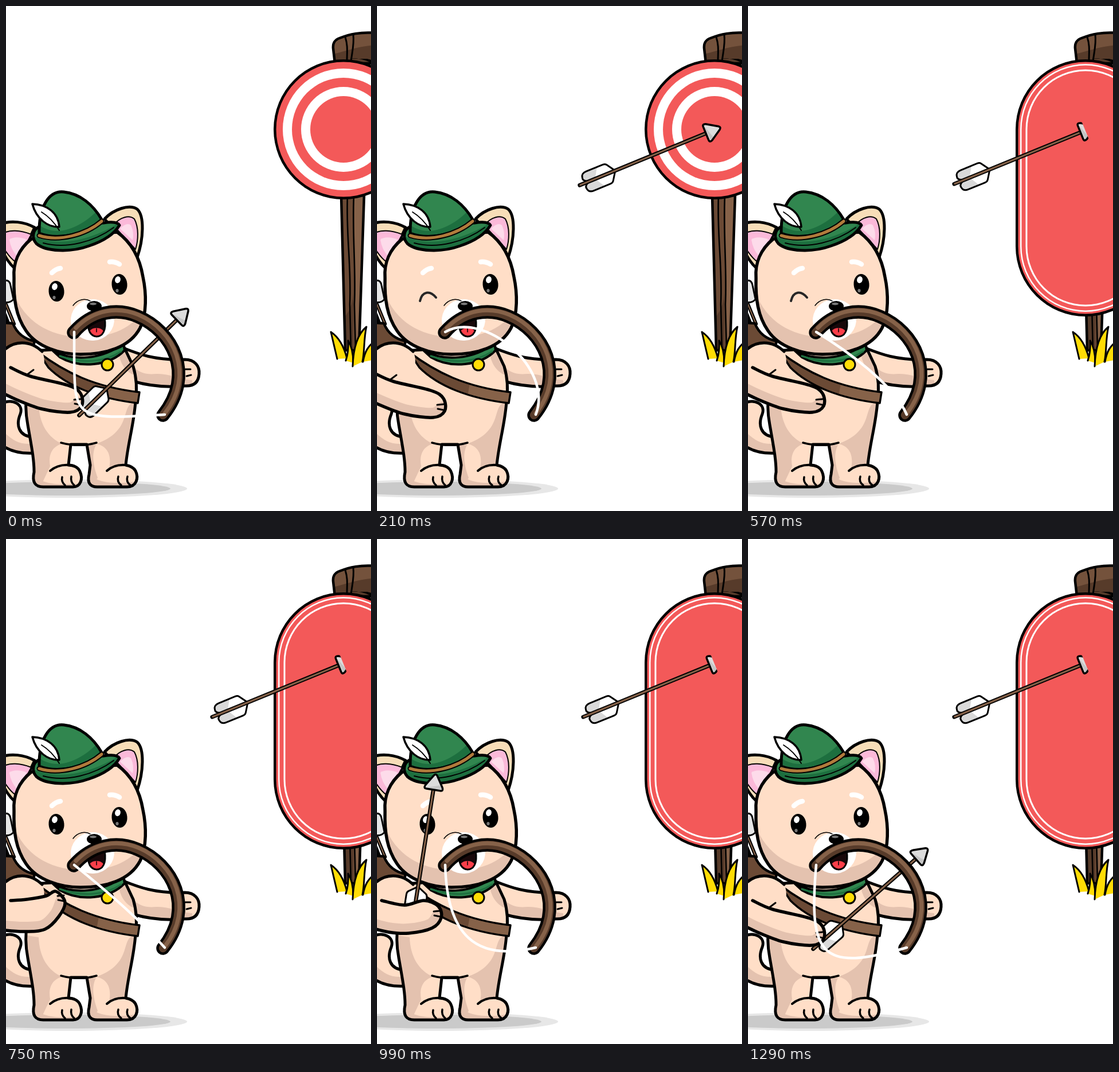
An HTML page with a canvas for the animation above (3600 ms loop, 637 px wide and 880 px high).

```html
<!DOCTYPE html>
<html lang="en">
<head>
<meta charset="utf-8">
<title>Archer</title>
<style>
html, body { margin: 0; width: 100%; height: 100%; overflow: hidden; background: #fff; }
canvas { display: block; width: 637px; height: 880px; }
</style>
</head>
<body>
<canvas id="stage" width="637" height="880"></canvas>
<script>
const ctx = document.getElementById('stage').getContext('2d');
const LOOP = 3600, STEP = 30, ARROW = 266;
const INK = '#000', SKIN = '#ffdec7', SHADE = '#e4c2af', RED = '#f35959';
const WOOD = '#6b4a35', WOOD_DARK = '#573b2a', WOOD_LIGHT = '#866249';
const GREEN = '#31864f', GREEN_DARK = '#1d6f3f', YELLOW = '#ffdc05';

const mix = (a, b, k) => a + (b - a) * k;
const smooth = k => k * k * (3 - 2 * k);
const clamp = k => Math.max(0, Math.min(1, k));
const easeOut = (k, power) => 1 - Math.pow(1 - clamp(k), power);

// Keys are [time, ...values]
function at(keys, t) {
  let i = 0;
  while (i < keys.length - 2 && t >= keys[i + 1][0]) i++;
  const a = keys[i], b = keys[i + 1];
  const k = smooth(clamp((t - a[0]) / (b[0] - a[0])));
  return a.slice(1).map((v, n) => mix(v, b[n + 1], k));
}

function paint(path, fill, width, color = INK) {
  const p = typeof path === 'string' ? new Path2D(path) : path;
  if (fill) { ctx.fillStyle = fill; ctx.fill(p); }
  if (width) { ctx.strokeStyle = color; ctx.lineWidth = width; ctx.stroke(p); }
}

function oval(x, y, rx, ry, fill, width, turn = 0) {
  const p = new Path2D();
  p.ellipse(x, y, rx, ry, turn, 0, Math.PI * 2);
  paint(p, fill, width);
}

function clipped(path, draw) {
  ctx.save();
  ctx.clip(new Path2D(path));
  draw();
  ctx.restore();
}

function spline(pts, close) {
  const p = new Path2D();
  p.moveTo(...pts[0]);
  for (let i = 0; i < pts.length - 1; i++) {
    const a = pts[Math.max(0, i - 1)], b = pts[i], c = pts[i + 1];
    const d = pts[Math.min(pts.length - 1, i + 2)];
    p.bezierCurveTo(b[0] + (c[0] - a[0]) / 6, b[1] + (c[1] - a[1]) / 6,
      c[0] - (d[0] - b[0]) / 6, c[1] - (d[1] - b[1]) / 6, c[0], c[1]);
  }
  if (close) p.closePath();
  return p;
}

// ---- Target ----
function drawPost() {
  const top = 'M574 100L571 74C570 64 574 59 582 56C600 49 618 45 645 47V100Z';
  clipped(top, () => {
    paint(top, '#74523c');
    paint('M570 84C595 78 615 70 645 68V100H570Z', WOOD_DARK);
  });
  paint(top, null, 4.5);
  paint('M592 54C597 70 595 80 595 97M606 50C608 66 604 80 602 97', null, 3);
  paint('M600 92C616 90 630 94 645 104V96L630 92Z', INK);
  const post = 'M585 330L592 600H616L625 330Z';
  clipped(post, () => {
    paint(post, WOOD);
    paint('M607 330L610 600H630V330Z', WOOD_LIGHT);
    paint('M580 552Q604 535 606 500V610H580Z', WOOD_DARK);
  });
  paint(post, null, 4.5);
  paint('M596 330C593 400 603 450 600 520L602 600M607 330C604 400 611 460 608 520L610 600', null, 2.6);
}

function drawGrass() {
  paint('M578 615L567 568C582 578 590 594 595 614', YELLOW, 3);
  paint('M593 618C597 606 598 596 597 583C604 594 606 606 606 622', YELLOW, 3);
  paint('M605 628C606 598 613 572 629 559C624 580 626 604 622 620', YELLOW, 3);
  paint('M623 620C626 602 632 592 645 583V616', YELLOW, 3);
}

function drawBoard(t) {
  const k = easeOut((t - 210) / 330, 5.3);
  const bottom = 337 + 204 * k;
  const band = (inset, drop, color) => {
    const p = new Path2D(), r = 122 - inset;
    const low = bottom - inset - drop * k * (1 - k);
    p.roundRect(589 - r, 93 + inset, r * 2, low - 93 - inset, r);
    paint(p, color);
  };
  band(0, 0, INK);
  band(4.5, 0, RED);
  band(mix(16, 8, k), 20, '#fff');
  band(mix(32, 10.5, k), 20, RED);
  band(mix(48, 17.5, k), 60, '#fff');
  band(mix(64, 20.5, k), 60, RED);
}

// ---- Arrows ----
function drawArrow(x, y, angle, sunk) {
  ctx.save();
  ctx.translate(x, y);
  ctx.rotate(angle * Math.PI / 180);
  if (sunk) {
    ctx.beginPath();
    ctx.rect(-10, -40, ARROW - 8, 80);
    ctx.clip();
  }
  for (const s of [-1, 1]) {
    const vane = `M20 0Q8 ${4 * s} 10 ${10 * s}Q11 ${18 * s} 20 ${18 * s}H52Q56 ${18 * s} 58 ${15 * s}L68 0Z`;
    paint(vane, '#fff');
    clipped(vane, () => paint(`M8 0H30L42 ${20 * s}H8Z`, '#d9d9d9'));
    paint(vane, null, 3);
  }
  paint('M1 0H238', null, 7);
  paint('M2 0H238', null, 3, WOOD_LIGHT);
  const b = ARROW - 27;
  const head = `M${b} -12Q${b} -18 ${b + 6} -15L${b + 25} -3Q${b + 29} 0 ${b + 25} 3L${b + 6} 15Q${b} 18 ${b} 12Z`;
  paint(head, '#dcdcdc');
  paint(`M${b + 2} -12L${b + 10} 12L${b + 3} 15Z`, '#c5c5c5');
  paint(head, null, 3.5);
  ctx.restore();
}

// The flight flattens out before it ends
function drawShot(t) {
  const kx = easeOut(t / 240, 1.75), ky = easeOut(t / 240, 2.5);
  drawArrow(mix(127, 359, kx), mix(714, 310.5, ky), mix(-44.3, -22.2, ky), t >= 240);
}

const NOCK = [
  [810, -70, 650, -70], [900, 30, 602, -85], [990, 61, 673, -81],
  [1080, 112, 706, -48], [1290, 113, 715, -41.2]
];

// ---- Archer ----
function drawBack() {
  oval(110, 841, 206, 16, '#e7e7e7');
  oval(105, 841, 182, 12, '#cacaca');
  const tail = 'M-6 692C12 684 31 694 25 711C17 730 22 749 46 751L48 779C28 780 8 776 -6 766Z';
  paint(tail, SKIN);
  clipped(tail, () => paint('M-6 740C10 756 24 766 48 762V784H-6Z', SHADE));
  paint(tail, null, 5);
  paint('M0 520L14 554M-4 532L5 555', null, 6);
  paint('M0 520L14 554', null, 2, WOOD_LIGHT);
  paint('M-3 479Q6 476 8 487L13 511Q8 518 -3 516Z', '#e6e6e6', 3);
  paint('M-6 552L12 553C18 568 30 580 50 584L48 592C24 586 8 594 -6 604Z', WOOD, 4.5);
}

function drawBody() {
  const arm = 'M205 596C230 606 260 618 312 616C330 616 338 628 337 641C336 656 328 663 312 662C282 665 250 662 222 654Z';
  paint(arm, SKIN);
  clipped(arm, () => paint('M212 600C216 630 232 644 262 641C285 640 300 650 325 652V668H212Z', SHADE));
  paint(arm, null, 5);
  paint('M313 633H322M315 645L323 643', null, 3);

  const body = 'M62 600C36 640 30 690 38 730C45 770 49 790 49 812C45 830 51 838 65 838H117C130 838 135 824 129 811C126 804 118 800 109 800L113 764H141L147 800L145 816C141 832 148 838 159 838H211C228 838 232 822 226 810C222 803 215 801 209 800C213 760 223 730 226 690C229 668 228 648 222 628L205 592Z';
  paint(body, SKIN);
  clipped(body, () => {
    paint('M30 690L57 694C58 728 73 752 98 763C78 768 74 785 77 802L60 838H40Z', SHADE);
    paint('M228 690C196 692 226 738 158 763C180 768 184 786 180 806L206 802L230 740Z', SHADE);
    paint('M141 765H157C149 780 152 800 160 822L150 838H140Z', SHADE);
    paint('M48 816C60 832 86 836 132 832V840H45ZM145 814C158 832 190 834 230 828V840H142Z', SHADE);
    paint('M195 600C200 625 208 638 228 645V604Z', SHADE);
  });
  paint(body, null, 5);
  paint('M96 761C115 766 138 767 158 761', null, 3.5);
  paint('M77 810C88 801 98 799 110 800M176 810C186 801 198 799 209 800', null, 4);
  paint('M103 835Q96 829 98 821M119 835Q112 829 114 820M201 835Q193 829 196 820M217 835Q209 829 212 820', null, 3.5);

  const strap = 'M56 603C102 638 154 664 233 673L230 692C160 684 106 662 74 630Z';
  paint(strap, WOOD);
  clipped(strap, () => paint('M165 640L156 692H240V650Z', WOOD_LIGHT));
  paint(strap, null, 3.5);
  const collar = 'M82 601C118 620 168 616 205 588L207 600C180 628 128 632 94 612Z';
  paint(collar, GREEN, 4);
  paint('M94 610C132 624 172 621 201 602', null, 3, GREEN_DARK);
  oval(177, 625, 10, 10, YELLOW, 3);
}

function drawHead(wink) {
  paint('M50 386C32 376 8 373 -8 380V420C-2 438 5 448 16 458Z', '#f7ddb8', 5);
  paint('M44 398C24 390 6 390 -5 396V420C2 432 8 440 18 447Z', '#fbb9d9', 2);
  paint('M36 407C25 402 12 402 6 407Q8 424 20 437Z', '#fddbea');
  paint('M172 371C188 354 215 345 229 354C242 366 240 406 229 438Z', '#f7ddb8', 5);
  paint('M187 382C200 367 215 364 224 371C232 386 231 408 226 424Z', '#fbb9d9', 2);
  paint('M199 388Q211 376 218 382Q224 395 221 408Z', '#fddbea');

  const head = 'M44 406C22 424 12 448 14 474C13 510 17 540 35 566C54 594 94 607 130 607C174 607 216 595 234 561C246 537 245 500 239 472C234 442 222 414 194 394Z';
  paint(head, SKIN);
  clipped(head, () => paint('M10 490C27 548 73 574 125 577C180 580 222 563 246 522V610H10Z', SHADE));
  paint(head, null, 5.5);

  paint('M80 465Q87 458 95 457M181 446Q190 445 198 450', null, 8.5, '#fff');
  const eye = (x, y) => {
    oval(x, y, 13.5, 18, INK, 0, -0.08);
    oval(x - 3, y - 8, 4.8, 6, '#fff', 0, 0.3);
    oval(x - 4, y + 11, 2.6, 3, '#777');
  };
  if (wink) paint('M75 514C79 497 92 495 103 508', null, 4, '#262626');
  else eye(88, 497);
  eye(198, 485);

  oval(151, 547, 38, 36, '#fff', 0, -0.1);
  paint('M117 522C125 511 138 509 147 514', null, 1.5);
  const mouth = 'M143 546Q158 552 172 543C176 566 168 576 158 576C147 575 142 564 143 546Z';
  paint(mouth, '#18080a');
  clipped(mouth, () => oval(158, 572, 14, 11, '#fb3f4a'));
  paint(mouth, null, 3);
  paint('M158 562V568', null, 1.5);
  oval(154, 523, 13, 9, INK);
  oval(152, 519, 6, 2.2, '#777');
}

function drawHat() {
  const brim = 'M57 385C47 390 44 404 53 414C69 428 112 430 145 418C169 410 188 399 198 382C195 376 182 376 170 378Z';
  paint(brim, GREEN);
  clipped(brim, () => paint('M45 400C82 420 145 412 198 377V430H45Z', GREEN_DARK));
  paint(brim, null, 5);
  const crown = 'M58 396C57 350 75 321 101 324C129 327 152 346 167 372C139 398 92 409 58 396Z';
  paint(crown, GREEN);
  clipped(crown, () => paint('M56 380C82 402 122 393 158 358L172 380L100 412H54Z', GREEN_DARK));
  paint(crown, null, 5);
  paint('M58 400C92 411 139 399 167 375', null, 9);
  paint('M58 400C92 411 139 399 167 375', null, 5, '#b17b3c');
  paint('M65 413C105 424 154 411 188 386', null, 2);
  paint('M46 345C72 346 91 360 93 385C74 386 53 372 46 345Z', '#fff', 3.5);
  paint('M62 359Q80 370 93 391', null, 2);
}

const pairs = list => list.trim().split(' ').map(p => p.split(',').map(Number));
const REST = pairs('8,630 42,645 108,661 130,675 132,697 112,708 62,702 14,684 -20,667');
const RAISED = pairs('8,630 36,628 70,622 87,614 103,633 92,658 68,680 30,684 -20,680');
const CARRY = pairs('8,630 48,638 82,630 107,640 112,660 96,678 55,687 20,685 -20,675');
const moved = (pts, x, y) => pts.map(p => [p[0] + x, p[1] + y]);
const ARM = [
  [0, REST], [210, moved(REST, -14, 9)], [300, moved(REST, -5, 4)], [540, REST], [570, REST],
  [750, RAISED], [840, moved(RAISED, -75, -30)], [900, moved(RAISED, -40, -20)],
  [990, CARRY], [1080, REST]
].map(([t, pts]) => [t, ...pts.flat()]);

function drawShoulder() {
  paint('M-6 602C14 580 48 580 64 603C72 626 62 648 48 658L-6 684Z', SKIN);
  paint('M-6 602C14 582 42 582 63 602', null, 5);
}

function drawForearm(t) {
  const v = at(ARM, t), pts = [];
  for (let i = 0; i < v.length; i += 2) pts.push([v[i], v[i + 1]]);
  const shape = spline(pts, true);
  paint(shape, SKIN);
  ctx.save();
  ctx.clip(shape);
  paint(spline(pts.slice(4)), null, 34, SHADE);
  ctx.restore();
  paint(spline(pts), null, 5.5);
  const [x, y] = pts[4], [ex, ey] = pts[1];
  paint(`M${x - 2} ${y - 12}L${x - 13} ${y - 11}M${x - 2} ${y - 2}L${x - 12} ${y - 4}`, null, 3);
  if (t < 630 || t >= 1050) paint(`M${ex - 6} ${ey - 2}L${ex + 6} ${ey - 11}`, null, 3);
}

// ---- Bow ----
const STRING = [
  [0, 120, 722, 105, 722], [210, 185, 530, 309, 630], [300, 172, 616, 224, 664],
  [390, 168, 622, 220, 672], [540, 172, 600, 255, 660], [570, 172, 600, 255, 660],
  [750, 172, 610, 232, 662], [990, 122, 690, 172, 737],
  [1140, 102, 740, 118, 778], [1290, 105, 728, 128, 755]
];

function drawBow(t) {
  const bow = 'M118 569C151 531 195 526 230 541C290 566 331 642 274 713';
  paint(bow, null, 23.5);
  paint(bow, null, 14.5, WOOD_DARK);
  paint('M122 561C154 528 196 524 231 538C293 564 331 642 277 710', null, 7, WOOD_LIGHT);
  const [a, b, c, d] = at(STRING, t);
  paint(`M119 568C${a} ${b} ${c} ${d} 277 712`, null, 4.5, '#fff');
}

function draw(t) {
  ctx.fillStyle = '#fff';
  ctx.fillRect(0, 0, 637, 880);
  ctx.lineCap = ctx.lineJoin = 'round';
  drawPost();
  drawBoard(t);
  drawGrass();
  drawBack();
  drawBody();
  drawHead(t >= 60 && t < 660);
  drawHat();
  drawShoulder();
  if (t >= 810) drawArrow(...at(NOCK, t));
  if (t < 90) drawShot(t);
  drawForearm(t);
  drawBow(t);
  if (t >= 90) drawShot(t);
}

const start = performance.now();
function tick() {
  const t = (performance.now() - start) % LOOP;
  draw(Math.floor(t / STEP) * STEP);
  requestAnimationFrame(tick);
}
tick();
</script>
</body>
</html>
```
